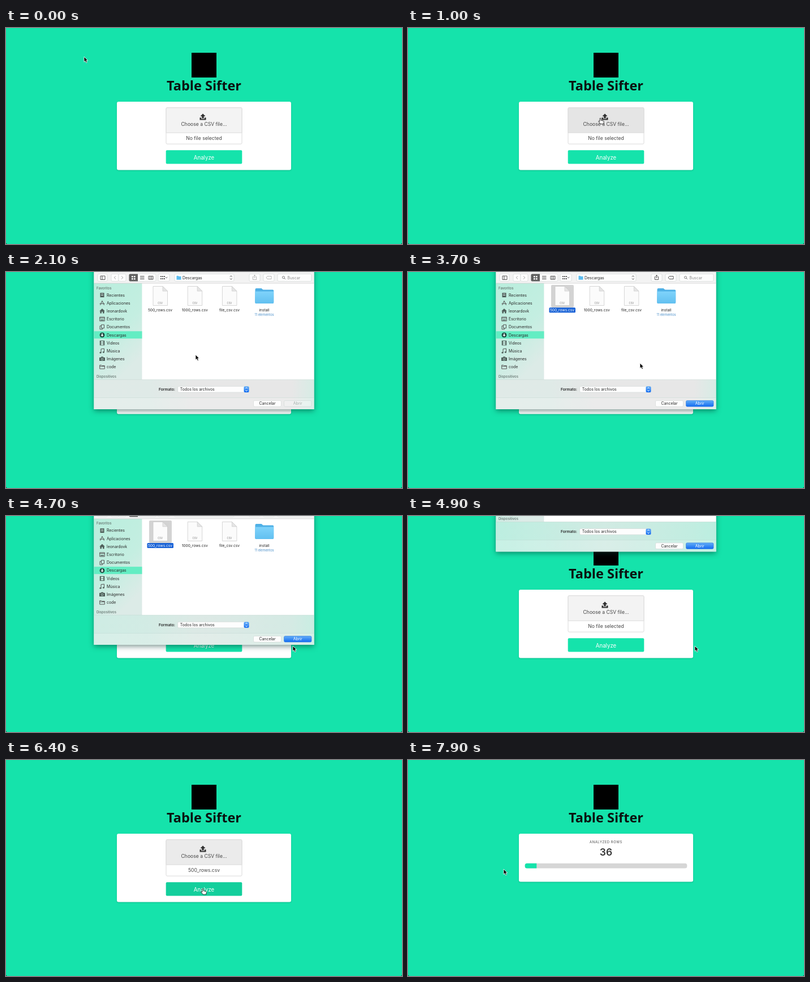
Animation, 700 px wide and 384 px high, one loop 8 s. Source, as an HTML page:

```html
<!DOCTYPE html>
<html lang="es">
<head>
<meta charset="utf-8">
<title>Table Sifter</title>
<style>
html, body { margin: 0; width: 100%; height: 100%; overflow: hidden; background: #15e3ab; }
svg { display: block; width: 700px; height: 384px; }
text { font-family: Inter, Roboto, sans-serif; fill: #262626; font-size: 6.9px; }
.mid { text-anchor: middle; }
.page { font-size: 8.6px; fill: #454545; }
.soft { filter: drop-shadow(0 1px 1px rgba(0, 40, 30, .22)); }
.drop { filter: drop-shadow(0 3px 5px rgba(0, 50, 40, .5)); }
.line { fill: none; stroke: #555; stroke-width: 1; }
.btn { fill: #fdfdfd; stroke: #cfd3d2; stroke-width: .6; }
</style>
</head>
<body>
<svg viewBox="0 0 700 384">
  <defs>
    <linearGradient id="side" x2=".5" y2="1">
      <stop offset="0" stop-color="#b9eedd"/><stop offset=".6" stop-color="#c4eee1"/><stop offset="1" stop-color="#dcebe7"/>
    </linearGradient>
    <linearGradient id="foot">
      <stop offset="0" stop-color="#e0eae7"/><stop offset=".25" stop-color="#dfeae7"/><stop offset=".45" stop-color="#e7e7e7"/>
      <stop offset=".9" stop-color="#e7e7e7"/><stop offset="1" stop-color="#d7ece5"/>
    </linearGradient>
    <linearGradient id="tint">
      <stop offset="0" stop-color="#b6efdf"/><stop offset=".5" stop-color="#cdebe2"/><stop offset="1" stop-color="#b6efdf"/>
    </linearGradient>
    <linearGradient id="blue" x2="0" y2="1">
      <stop offset="0" stop-color="#62adf8"/><stop offset="1" stop-color="#136cf0"/>
    </linearGradient>
    <linearGradient id="folder" x2="0" y2="1">
      <stop offset="0" stop-color="#7fd3fb"/><stop offset="1" stop-color="#62c0f0"/>
    </linearGradient>
  </defs>

  <rect width="700" height="384" fill="#15e3ab"/>
  <rect x="328" y="44" width="44" height="44"/>
  <text class="mid" x="350" y="111" style="font:700 23.5px 'Open Sans','Noto Sans',sans-serif;fill:#0b1210">Table Sifter</text>

  <rect id="card" class="soft" x="196" y="131" width="308" height="121.5" rx="3" fill="#fff"/>
  <g id="form">
    <rect x="283" y="141.7" width="134" height="64.5" rx="2" fill="#fff" stroke="#dbdbdb"/>
    <path id="cta" d="M283 186.2V143.7q0-2 2-2h130q2 0 2 2v42.5z" stroke="#dbdbdb"/>
    <path d="M348 152.2l4.6 4.8h-2.8v3.6h-3.6V157h-2.8zM342.5 159.3h2.6v2.2h5.8v-2.2h2.6v4.2h-11z" fill="#333"/>
    <text class="page mid" x="350" y="174">Choose a CSV file...</text>
    <text class="page mid" id="file" x="350" y="199.2"></text>
    <rect id="go" x="282.7" y="217.2" width="134.6" height="24.4" rx="2"/>
    <text class="mid" x="350" y="233.5" style="font-size:9.7px;fill:#fff">Analyze</text>
  </g>
  <g id="result">
    <text class="mid" x="350" y="148.3" style="font-size:5.9px;letter-spacing:.55px;fill:#4a4a4a">ANALYZED ROWS</text>
    <text class="mid" id="count" x="350" y="169.9" style="font-size:17.5px;font-weight:600;fill:#363636"></text>
    <rect x="206.7" y="183.8" width="286.6" height="8.8" rx="3.6" fill="#d6d6d6"/>
    <path id="bar" fill="#15e3ab"/>
  </g>

  <g id="sheet">
    <rect class="drop" x="155.5" y="-10" width="389" height="254" fill="#e7e7e7"/>
    <rect x="155.5" y="20" width="85" height="171.5" fill="url(#side)"/>
    <rect x="240.5" y="20" width="304" height="171.5" fill="#fff"/>
    <rect x="155.5" y="191.3" width="389" height="52.7" fill="url(#foot)"/>
    <rect id="glow" x="155.5" y="191.3" width="389" height="52.7" fill="url(#tint)"/>
    <rect x="155.5" y="223.5" width="389" height="20.5" fill="#fff" opacity=".16"/>
    <path d="M155.5 223.5h389M155.5 191.3h389" stroke="#b5cfc7" stroke-width=".5" opacity=".7"/>
    <rect x="155.5" y="-10" width="389" height="30" fill="#f3f3f3"/>
    <path d="M155.5 20h389" stroke="#c9c9c9" stroke-width=".7"/>
    <g id="tools"></g>
    <rect x="155.5" y="105.3" width="85" height="13" fill="#63edc3"/>
    <g id="places"></g>
    <g id="files"></g>
    <text x="270" y="211" style="font-weight:600;font-size:6.7px">Formato:</text>
    <rect class="btn" x="303.5" y="203.3" width="126" height="10.6" rx="2"/>
    <rect id="knob" x="420.5" y="203.3" width="9" height="10.6" rx="2" fill="url(#blue)"/>
    <path id="chev" class="line" d="M423.2 207.3l1.8-2 1.8 2M423.2 209.9l1.8 2 1.8-2"/>
    <text x="307.8" y="211.1">Todos los archivos</text>
    <rect class="btn" x="437.5" y="228.6" width="49" height="10.6" rx="2"/>
    <text class="mid" x="462" y="236.4">Cancelar</text>
    <rect id="open" x="491.5" y="228.6" width="48.5" height="10.6" rx="2" stroke-width=".6"/>
    <text class="mid" id="openText" x="515.7" y="236.4">Abrir</text>
  </g>

  <path d="M0 381.5V384h2.5Q0 384 0 381.5zM700 381.5V384h-2.5q2.5 0 2.5-2.5z" fill="#03241b"/>
  <path id="arrow" d="M0 0v9.3l2.1-1.9 1.6 3.4 1.7-.8-1.5-3.3h2.9z" fill="#000" stroke="#fff" stroke-width=".8"/>
  <path id="hand" d="M-1 .8q1-1.4 2 0v3.3l4 .9q1.6.4 1.3 2L5.6 10.6H.4L-3.2 6.4q-.2-1.4 1.1-1L-1 6.3z" fill="#fff" stroke="#111" stroke-width=".8"/>
</svg>
<script>
const $ = id => document.getElementById(id);
const set = (id, attrs) => { for (const k in attrs) $(id).setAttribute(k, attrs[k]); };
const show = (id, on) => { $(id).style.display = on ? '' : 'none'; };
const clamp = v => Math.min(1, Math.max(0, v));
const ease = p => (1 - Math.cos(Math.PI * clamp(p))) / 2;

const line = d => `<path class="line" d="${d}"/>`;
const solid = (d, fill = '#4f5f5a') => `<path d="${d}" fill="${fill}"/>`;
const button = (x, w) => `<rect class="btn" x="${x}" y="3.5" width="${w}" height="13" rx="2"/>`;

// Toolbar
$('tools').innerHTML =
  [[162, 17], [186, 13], [199, 13], [217.5, 47.5], [269, 20], [298, 105], [430, 19], [455, 19], [480, 60]]
    .map(b => button(...b)).join('') +
  '<path d="M233 3.5h-13.5q-2 0-2 2v9q0 2 2 2H233z" fill="#606060"/>' +
  line('M167 7h8v6.5h-8zM170 7v6.5') +
  '<g opacity=".55">' + line('M194 7.3l-2.7 2.7 2.7 2.7M204 7.3l2.7 2.7-2.7 2.7') + '</g>' +
  solid('M222 7h2.6v2.6H222zM226 7h2.6v2.6H226zM222 11h2.6v2.6H222zM226 11h2.6v2.6H226z', '#fff') +
  line('M237 7.5h7.5M237 10h7.5M237 12.5h7.5M252 7.3h8v5.8h-8zM254.7 7.3v5.8M257.4 7.3v5.8M282 9l1.7 1.7L285.4 9') +
  solid('M273 7h2v2h-2zM276 7h2v2h-2zM279 7h2v2h-2zM273 11h2v2h-2zM276 11h2v2h-2zM279 11h2v2h-2z', '#555') +
  solid('M301.5 6.7h3l1 1h4v6h-8z', '#5bbcf0') +
  '<text x="312" y="12.5">Descargas</text>' +
  line('M396 8.6l1.8-2 1.8 2M396 11.4l1.8 2 1.8-2') +
  '<g id="acts">' + line('M438 8.5h-1.6v5h6.2v-5H441M439.5 11V5.5M437.8 7l1.7-1.7L441.2 7M462 7.5h7v5h-7l-2-2.5z') + '</g>' +
  '<g opacity=".75"><circle class="line" cx="490.5" cy="9.5" r="2"/>' + line('M492 11l2 2') + '</g>' +
  '<text x="497.5" y="12.5" style="fill:#8a8a8a">Buscar</text>';

// Sidebar; icons are drawn around their own centre
const places = [
  ['Recientes', solid('M-3.5-4h7v8h-7z') + solid('M-2-2.5h4v1h-4zM-2 0h4v1h-4z', '#d9efe8')],
  ['Aplicaciones', line('M-3.5 3.7L0-4 3.5 3.7M-4.5 1h9')],
  ['leonardovk', solid('M-4.8 0L0-4.5 4.8 0H3.6v4H1V1h-2v3h-2.6V0z')],
  ['Escritorio', line('M-4.3-3.5h8.6v7h-8.6zM-4-1.7h8') + solid('M-3 1h6v1.5h-6z')],
  ['Documentos', line('M-1.5-4h5v6h-5zM-1.5-2H-4v6h4.6V2')],
  ['Descargas', '<circle r="4.5" fill="#235046"/>' + solid('M-.8-2.8h1.6V0h1.7L0 2.8-2.5 0h1.7z', '#fff')],
  ['Videos', solid('M-4.2-4.2h8.4v8.4h-8.4z') + solid('M-2.2-3.2h4.4v2.8h-4.4zM-2.2.4h4.4v2.8h-4.4z', '#c8ece0')],
  ['Música', line('M-2 3V-3.5L3.5-4.2V2') + '<ellipse cx="-3" cy="3" rx="1.6" ry="1.3" fill="#4f5f5a"/><ellipse cx="2.4" cy="2.2" rx="1.6" ry="1.3" fill="#4f5f5a"/>'],
  ['Imágenes', solid('M-5-2.7h2.5l1-1.4h3l1 1.4H5v6.2H-5z') + '<circle cy=".3" r="1.8" fill="none" stroke="#c8ece0" stroke-width=".7"/>'],
  ['code', line('M-4.3-3.2h3l1 1h4.6v5.5h-8.6zM-4.3-1h8.6')]
];
const heading = (y, s) => `<text x="160" y="${y}" style="font-size:6px;font-weight:500;fill:#61716c">${s}</text>`;
$('places').innerHTML = heading(30.5, 'Favoritos') + heading(188, 'Dispositivos') +
  places.map(([name, icon], i) => {
    const y = 41 + i * 14.2;
    return `<g transform="translate(170 ${y})">${icon}</g><text x="178" y="${y + 2.5}">${name}</text>`;
  }).join('');

// File grid
const sheetIcon = x => `<g transform="translate(${x} 0)">
  <path d="M-12.5 25.5H4.5L13 34v25.5h-25.5z" fill="#fbfbfb" stroke="#c6c6c6" stroke-width=".7"/>
  <path d="M4.5 25.5V34H13z" fill="#e5e5e5" stroke="#c6c6c6" stroke-width=".6"/>
  <text class="mid" y="56.5" style="font-size:4.2px;fill:#777">CSV</text></g>`;
$('files').innerHTML =
  `<g id="pick"><rect x="253" y="23" width="40" height="40" rx="2" fill="#d3d3d3"/>
   <rect x="249.5" y="63.2" width="46.5" height="9" rx="1.5" fill="#1761d6"/></g>` +
  ['500_rows.csv', '1000_rows.csv', 'file_csv.csv'].map((name, i) => {
    const x = 272.5 + i * 61.2;
    return sheetIcon(x) + `<text class="mid" id="name${i}" x="${x}" y="70.2" style="font-size:6.6px">${name}</text>`;
  }).join('') +
  `<path d="M440.5 31q0-2 2-2h9l3 2.5h17q1.700 0 1.700 2V54q0 2-2 2h-29q-2 0-2-2z" fill="#4fb0e6"/>
   <path d="M440.500 34.500h32.700V54q0 2-2 2h-29q-1.700 0-1.700-2z" fill="url(#folder)"/>
   <text class="mid" x="456.500" y="70.2" style="font-size:6.600px">install</text>
   <text class="mid" x="456.500" y="78" style="font-size:5.700px;fill:#4a8fc9">11 elementos</text>`;

// Pointer path: time, x, y
const path = [
  [0, 138, 51], [900, 340, 160], [1700, 340, 160], [2100, 335, 147], [2400, 332, 140],
  [2800, 271, 45], [3150, 271, 45], [3700, 410, 162], [4250, 507, 231], [5200, 507, 231],
  [5800, 397, 229], [6200, 348, 228.5], [7100, 348, 228.5], [7900, 169, 194]
];
function pointer(t) {
  let i = 0;
  while (i < path.length - 2 && t >= path[i + 1][0]) i++;
  const [t0, x0, y0] = path[i], [t1, x1, y1] = path[i + 1];
  const passing = t0 === 3150 || t0 === 3700 || t0 === 5800;
  const p = clamp((t - t0) / (t1 - t0));
  const k = passing ? p : ease(p);
  return [x0 + (x1 - x0) * k, y0 + (y1 - y0) * k];
}
const between = (t, a, b) => t >= a && t < b;

function draw(t) {
  const out = ease((t - 1510) / 400) - ease((t - 4636) / 400);
  const active = t >= 1900;
  const picked = t >= 2800;
  const done = t >= 7100;

  show('sheet', out > 0.001);
  set('sheet', { transform: `translate(0 ${(out - 1) * 244})` });
  set('glow', { opacity: t < 3000 ? 1 - clamp((t - 1800) / 300) : clamp((t - 4600) / 200) * .85 });
  show('knob', active);
  $('chev').style.stroke = active ? '#fff' : '#444';
  show('pick', picked);
  $('name0').style.fill = picked ? '#fff' : '';
  set('acts', { opacity: picked ? 1 : .4 });
  set('open', picked
    ? { fill: between(t, 4400, 4600) ? '#0b55cf' : 'url(#blue)', stroke: '#2a75de' }
    : { fill: 'rgba(255,255,255,.25)', stroke: '#cbd6d2' });
  $('openText').style.fill = picked ? '#fff' : '#a5b0ac';

  show('form', !done);
  show('result', done);
  set('card', { height: done ? 85.5 : 121.5 });
  set('cta', { fill: between(t, 800, 4600) ? '#e5e5e5' : t >= 5100 ? '#ebebeb' : '#f3f3f3' });
  $('file').textContent = t < 5100 ? 'No file selected' : '500_rows.csv';
  set('go', { fill: between(t, 6500, 6700) ? '#11c392' : t >= 5700 ? '#13cf9c' : '#15e3ab' });

  const rows = Math.round(36 * clamp((t - 7200) / 700));
  const w = 286.6 * rows / 500;
  const r = Math.min(3.6, w);
  $('count').textContent = rows;
  set('bar', { d: `M${206.7 + w} 183.8v8.8h${r - w}q${-r} 0 ${-r} -3.6v-1.600q0 -3.600 ${r} -3.600z` });

  const [x, y] = pointer(t);
  const hand = between(t, 1000, 1900) || between(t, 5700, 7100);
  show('hand', hand);
  show('arrow', !hand);
  set(hand ? 'hand' : 'arrow', { transform: `translate(${x} ${y})` });
}

function tick() {
  draw(Math.floor(performance.now() % 8000 / 100) * 100);
  requestAnimationFrame(tick);
}
tick();
</script>
</body>
</html>
```
